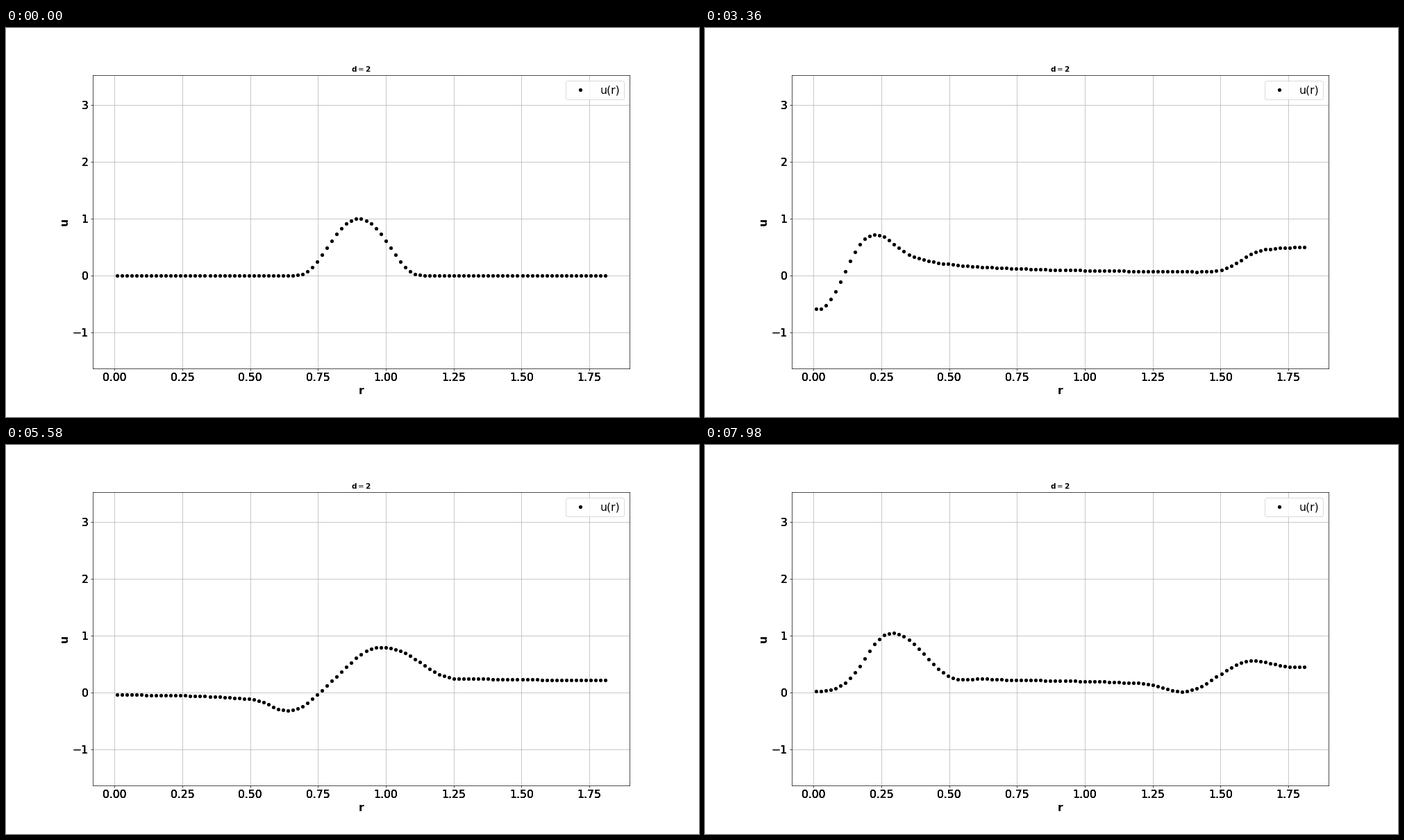
Write a matplotlib script that moves like this. It is 998 px wide and 561 px high and loops after 8000 ms.

```python
import numpy as np
import matplotlib.pyplot as plt
from matplotlib.animation import FuncAnimation

W, H, DPI = 998, 561, 62.375
LOOP_MS, STEPS = 8000, 267
DIM = 2                 # space dimension of the radial wave equation
RADIUS, DR = 1.8, 0.018
DT = DR / 2
KICK = 0.57             # initial velocity relative to the initial bump

plt.rcParams.update({"font.family": "DejaVu Sans", "font.size": 18})

r = DR / 2 + DR * np.arange(101)


def bump(r, centre=RADIUS / 2, half=RADIUS / 6):
    """Smooth bump of height 1 that vanishes outside centre +- half."""
    x2 = np.minimum(((r - centre) / half) ** 2, 0.9999)
    return np.exp(-4 * x2 / (1 - x2))


def laplacian(u):
    out = np.zeros_like(u)
    out[1:-1] = ((u[2:] - 2 * u[1:-1] + u[:-2]) / DR**2
                 + (DIM - 1) / r[1:-1] * (u[2:] - u[:-2]) / (2 * DR))
    return out


def solve():
    """Semi-implicit Euler solution, one row per time step."""
    wave = np.zeros((STEPS, r.size))
    u = bump(r)
    speed = KICK * u
    wave[0] = u
    for n in range(1, STEPS):
        speed = speed + DT * laplacian(u)
        u = u + DT * speed
        u[0], u[-1] = u[1], u[-2]
        wave[n] = u
    return wave


wave = solve()

# The tiny margin keeps the pixel height from rounding down.
fig = plt.figure(figsize=(W / DPI, (H + 1e-6) / DPI), dpi=DPI,
                 facecolor="white")
left, right, top, bottom = 0.125 * W, 0.9 * W, 68.2, 491
ax = fig.add_axes([left / W, 1 - bottom / H,
                   (right - left) / W, (bottom - top) / H])
ax.set_xlim(-0.081, 1.899)
ax.set_ylim(-1.637, 3.525)
x_ticks = np.arange(0, 1.76, 0.25)
y_ticks = np.arange(-1, 4)
x_names = [f"{x:.2f}" for x in x_ticks]
y_names = [str(y).replace("-", "\u2212") for y in y_ticks]
ax.set_xticks(x_ticks, x_names)
ax.set_yticks(y_ticks, y_names)
ax.grid(True)
ax.set_title(r"$\mathbf{d} = \mathbf{2}$", fontsize=12)
ax.set_xlabel("r", weight="bold")
ax.set_ylabel("u", weight="bold")

# Tick labels are printed over themselves, which hardens their edges.
x_place, x_va, x_ha = ax.get_xaxis_text1_transform(7)
y_place, y_va, y_ha = ax.get_yaxis_text1_transform(7)
for _ in range(3):
    for x, name in zip(x_ticks, x_names):
        ax.text(x, 0, name, transform=x_place, va=x_va, ha=x_ha)
    for y, name in zip(y_ticks, y_names):
        ax.text(0, y, name, transform=y_place, va=y_va, ha=y_ha)

dots, = ax.plot(r, wave[0], "o", color="black", ms=5, label="u(r)")
ax.legend(loc="upper right")


def update(n):
    dots.set_ydata(wave[n])
    return dots,


anim = FuncAnimation(fig, update, frames=STEPS, interval=LOOP_MS / STEPS,
                     repeat=True, repeat_delay=0)
plt.show()
```
